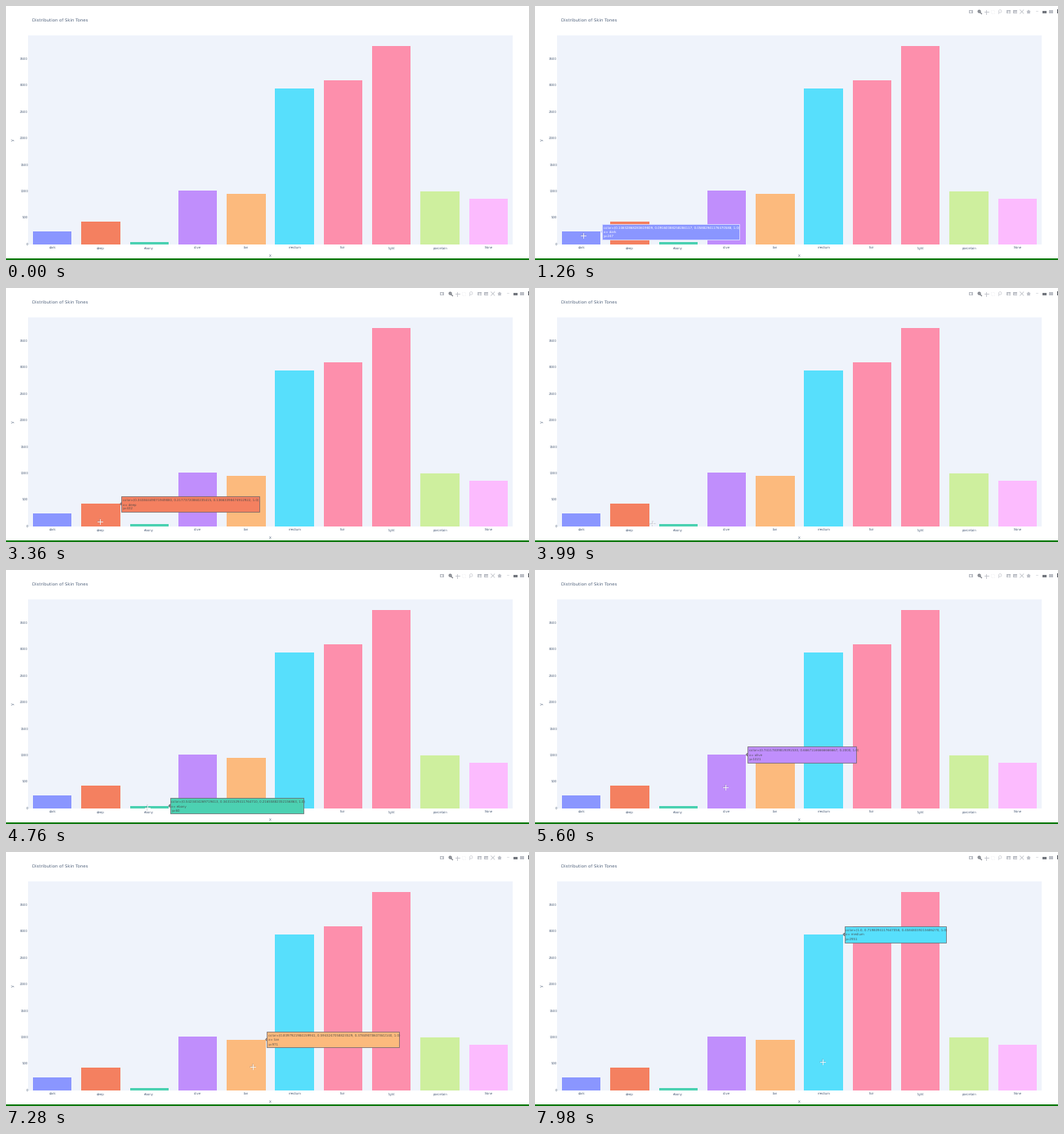
A matplotlib script that plays this animation: 640x311 px, repeating every 8000 ms.

```python
import matplotlib as mpl
import matplotlib.pyplot as plt
from matplotlib.animation import FuncAnimation
from matplotlib.patches import Circle, Polygon, Rectangle

W, H, DPI = 640, 311, 100
INTERVAL, FRAMES, STEP = 40, 200, 70
BASE, SCALE, LEFT, PITCH = 292.3, 0.06486, 27, 59.3
BAR_W = 0.8 * PITCH
ENTER = 1050
INK = "#2a3f5f"

mpl.rcParams["font.family"] = "DejaVu Sans"
mpl.rcParams["text.hinting"] = "none"

BARS = [
    ("dark", 247, "#8a96ff"), ("deep", 432, "#f48060"),
    ("ebony", 55, "#4cd1b2"), ("olive", 1021, "#c08efc"),
    ("tan", 967, "#fcba7d"), ("medium", 2951, "#57dffc"),
    ("fair", 3105, "#fd8fac"), ("light", 3750, "#fd8fac"),
    ("porcelain", 1010, "#ceef9e"), ("None", 868, "#fcbbfe"),
]

# Hover labels of the first bars: box width, colour tuple, count
HOVERS = [
    (168, "0.14632868283619809, 0.09160088258284117, 0.05882941176470588", 247),
    (168.5, "0.34384449071949880, 0.21773720860235415, 0.13663398474912922", 432),
    (163, "0.5423404269719413, 0.34311529411764710, 0.21655882352156863", 60),
    (133.5, "0.74117839819391530, 0.66671166666666667, 0.2000", 1021),
    (161.5, "0.8397921984159941, 0.5943247058823529, 0.37849078607842140", 971),
    (124.5, "1.0, 0.7198094117647058, 0.45848039215686270", 2951),
]

# Pointer moves: start ms, end ms, start point, end point
MOVES = [
    (1890, 2870, (59, 281), (115, 286)),
    (3570, 4270, (115, 286), (173, 291)),
    (4970, 5600, (173, 291), (233, 266)),
    (6160, 6650, (233, 266), (302, 263)),
    (7280, 7840, (302, 263), (352, 257)),
]

fig = plt.figure(figsize=(W / DPI, H / DPI), dpi=DPI, facecolor="white")
ax = fig.add_axes([0, 0, 1, 1])
ax.set(xlim=(0, W), ylim=(H, 0))
ax.axis("off")


def px(size):
    """Pixels to points."""
    return size * 72 / DPI


def rect(x, y, w, h, color, **kw):
    kw = {"lw": 0, **kw}
    return ax.add_patch(Rectangle((x, y), w, h, fc=color, **kw))


def label(x, y, text, size=3.85, color=INK, ha="center", **kw):
    kw = {"alpha": 0.8, **kw}
    return ax.text(x, y, text, fontsize=px(size), color=color, ha=ha,
                   va="center_baseline", **kw)


def stroke(xs, ys, color, width=0.8, **kw):
    return ax.plot(xs, ys, color=color, lw=px(width), **kw)[0]


def bar_left(i):
    return LEFT + PITCH * (i + 0.5) - BAR_W / 2


def bar_top(i):
    return BASE - BARS[i][1] * SCALE


def draw_chart():
    rect(LEFT, 36.3, 10 * PITCH, BASE - 36.3, "#eff3fb")
    for i, (name, _, color) in enumerate(BARS):
        rect(bar_left(i), bar_top(i), BAR_W, BASE - bar_top(i), color)
        label(LEFT + PITCH * (i + 0.5), 295.6, name)
    for value in range(0, 3501, 500):
        label(27, BASE - value * SCALE, str(value), ha="right")
    label(32.3, 17, "Distribution of Skin Tones", size=5.4, ha="left")
    label(323, 305.3, "x", size=4.6)
    label(8, 164, "y", size=4.6, rotation=90)
    rect(0, 309.3, W, 1.5, "#0a7a0a")


def draw_modebar():
    """Toolbar icons; returns every artist with its full opacity."""
    grey, dark = "#bcbfc6", "#74787f"
    y = 7
    parts = [
        rect(530.7, 5.2, 5, 3.8, grey),
        ax.add_patch(Circle((533.2, 7.2), 1.1, fc="white", lw=0)),
        ax.add_patch(Circle((543.6, 6.6), 1.5, fc="#a5a8ae", ec=dark, lw=px(1))),
        stroke([544.7, 546.5], [7.8, 9.6], dark, 1.1),
        stroke([549.6, 554.6], [y, y], grey),
        stroke([552.1, 552.1], [4.5, 9.5], grey),
        rect(558.4, 4.9, 4, 4.2, "none", ec="#e4e6ea", lw=px(0.6), ls=":"),
        ax.add_patch(Circle((569.2, 6.4), 1.7, fc="none", ec="#ccced4", lw=px(0.7))),
        stroke([567.8, 567.6], [7.4, 9.6], "#ccced4", 0.7),
    ]
    for x in (579.2, 587.6):
        parts += [rect(x - 2.3, 4.7, 4.6, 4.6, grey),
                  stroke([x - 1.3, x + 1.3], [y, y], "white", 0.7)]
    parts.append(stroke([579.2, 579.2], [5.7, 8.3], "white", 0.7))
    for s in (-1, 1):
        parts.append(stroke([593.5, 597.9], [y - 2.2 * s, y + 2.2 * s], grey, 0.7))
    home = [(601.4, 7), (604, 4.6), (606.6, 7), (605.8, 7), (605.8, 9.2),
            (602.2, 9.2), (602.2, 7)]
    parts += [
        ax.add_patch(Polygon(home, fc=grey, lw=0)),
        stroke([613.4, 615.4], [6.2, 6.2], "#d8dade", 0.8),
        rect(620.6, 5.6, 5.2, 3, dark),
        rect(629, 5, 4.6, 1.5, grey),
        rect(629, 7.4, 4.6, 1.5, grey),
        rect(638.6, 4.4, 5, 5, "#55585f"),
    ]
    return parts


def draw_hover(i):
    width, rgba, count = HOVERS[i]
    name, _, color = BARS[i]
    light = i == 0
    ink, edge = ("white", "#e6e9ff") if light else ("#444444", "#6a6468")
    x, top = bar_left(i) + BAR_W + 1.7, bar_top(i) - 9.6
    style = dict(ec=edge, lw=px(0.7), zorder=5)
    tip = [(x, top + 7.8), (x - 1.7, top + 9.6), (x, top + 11.4)]
    parts = [ax.add_patch(Polygon(tip, fc=color, **style)),
             rect(x, top, width, 19.3, color, **style)]
    lines = (f"color=({rgba}, 1.0)", f"x= {name}", f"y={count}")
    for k, line in enumerate(lines):
        parts.append(label(x + 1.8, top + 3.8 + 5.8 * k, line, size=3.82,
                           color=ink, ha="left", zorder=6,
                           alpha=1 if light else 0.85))
    return parts


def draw_pointer():
    return [stroke([], [], "#8a8a96", 1.5, alpha=0.35, zorder=8),
            stroke([], [], "white", 0.8, alpha=0.9, zorder=9)]


def pointer_at(t):
    pos = MOVES[0][2]
    for start, end, a, b in MOVES:
        if t >= start:
            u = min((t - start) / (end - start), 1)
            u = u * u * (3 - 2 * u)
            pos = (a[0] + (b[0] - a[0]) * u, a[1] + (b[1] - a[1]) * u)
    return pos


draw_chart()
modebar = draw_modebar()
hovers = [draw_hover(i) for i in range(len(HOVERS))]
pointer = draw_pointer()


def update(frame):
    t = frame * INTERVAL // STEP * STEP
    x, y = pointer_at(t)
    inside = t >= ENTER

    for part in modebar:
        part.set_alpha(min(max((t - ENTER + STEP) / 210, 0), 1))
    for i, parts in enumerate(hovers):
        shown = inside and 0 <= x - bar_left(i) <= BAR_W
        for part in parts:
            part.set_visible(shown)
    for line in pointer:
        line.set_visible(inside)
        line.set_data([x - 2.6, x + 2.6, float("nan"), x, x],
                      [y, y, float("nan"), y - 2.6, y + 2.6])
    return modebar + sum(hovers, []) + pointer


anim = FuncAnimation(fig, update, frames=FRAMES, interval=INTERVAL,
                     repeat=True, repeat_delay=0, blit=False)
plt.show()
```
